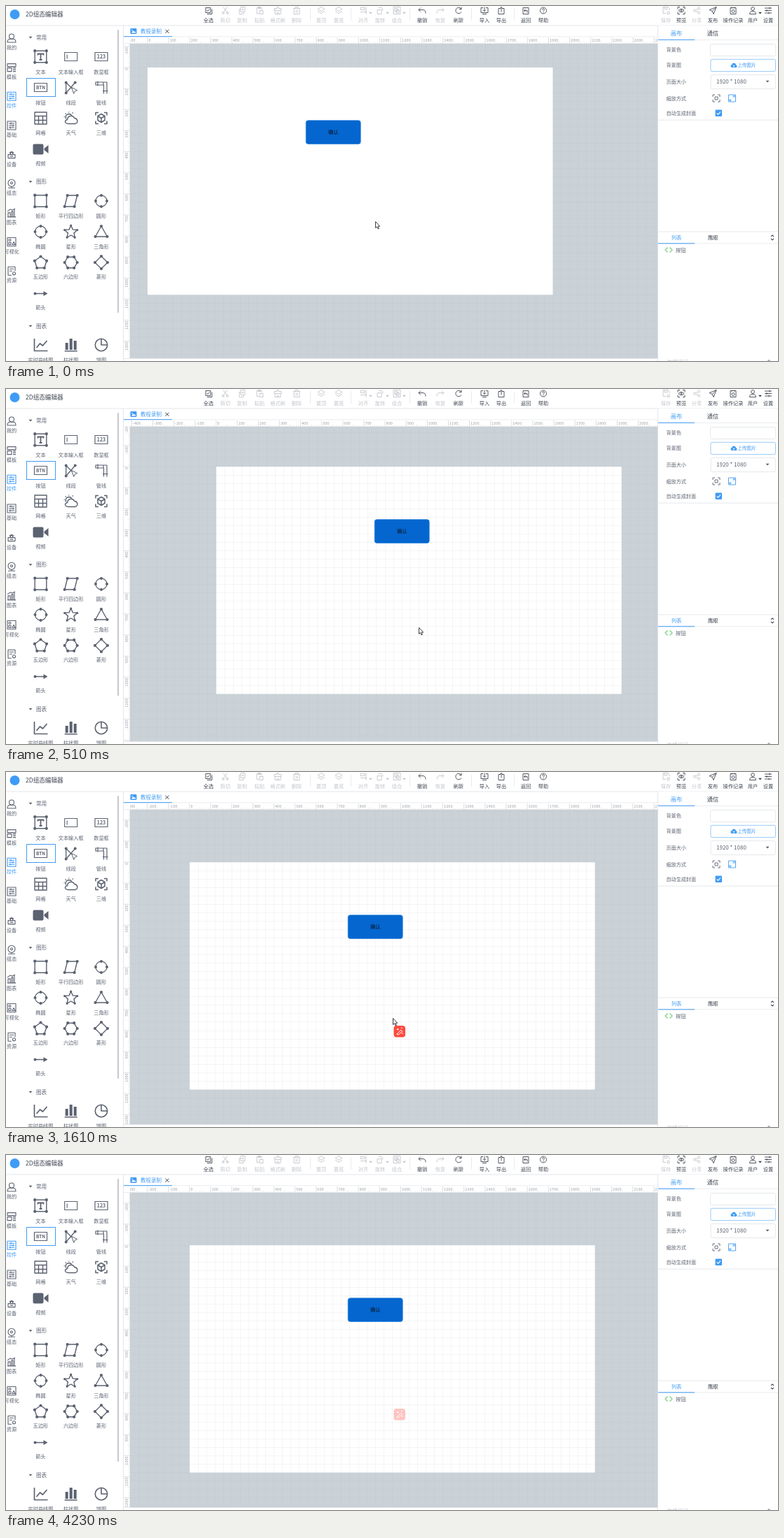
Write an HTML page that moves like this. It is 1102 px wide and 508 px high and loops after 4330 ms.

```html
<!DOCTYPE html>
<html>
<head>
<meta charset="utf-8">
<title>2D组态编辑器</title>
<style>
@property --x { syntax: "<length>"; inherits: true; initial-value: 202px; }
@property --y { syntax: "<length>"; inherits: true; initial-value: 88px; }
@property --cx { syntax: "<length>"; inherits: true; initial-value: 527px; }
@property --cy { syntax: "<length>"; inherits: true; initial-value: 308px; }
@property --show { syntax: "<number>"; inherits: true; initial-value: 1; }
@property --badge { syntax: "<number>"; inherits: true; initial-value: 0; }
@property --grid { syntax: "<number>"; inherits: true; initial-value: 1; }

html, body { margin: 0; width: 100%; height: 100%; overflow: hidden; background: #fff; }
svg { display: block; width: 1102px; height: 508px; animation: drag 4330ms step-end infinite; }
text { font-family: "Noto Sans CJK SC", "Noto Sans CJK", "Noto Sans", sans-serif; }
.page { transform: translate(var(--x), var(--y)); }
.rule-x { transform: translateX(var(--x)); }
.rule-y { transform: translateY(var(--y)); }
.cursor { transform: translate(var(--cx), var(--cy)); opacity: var(--show); }
.badge { opacity: var(--badge); }
.page-grid { opacity: var(--grid); }
.crisp { shape-rendering: crispEdges; }

@keyframes drag {
  0% { --x: 202px; --y: 88px; --cx: 527px; --cy: 308px; --show: 1; --badge: 0; --grid: .12; }
  3.46% { --x: 292px; --y: 70px; --cx: 584px; --cy: 293px; --grid: 1; }
  6.23% { --x: 316px; --y: 80px; --cx: 606px; --cy: 308px; }
  9% { --x: 314px; --y: 97px; --cx: 604px; --cy: 327px; }
  11.77% { --x: 300px; --y: 111px; --cx: 589px; --cy: 341px; }
  15.24% { --x: 286px; --y: 124px; --cx: 569px; --cy: 350px; }
  18.01% { --x: 274px; --y: 131px; --cx: 554px; --cy: 354px; }
  20.78% { --x: 265px; --y: 131px; --cx: 552px; --cy: 354px; }
  24.24% { --x: 262px; --y: 129px; --cx: 552px; --cy: 353px; }
  37.18% { --cx: 552px; --cy: 352px; --badge: 1; }
  40.64% { --cx: 626px; --cy: 390px; }
  44.11% { --cx: 738px; --cy: 431px; }
  47.57% { --cx: 850px; --cy: 474px; --badge: .92; }
  50.34% { --cx: 930px; --cy: 380px; --badge: .86; }
  53.11% { --cx: 975px; --cy: 240px; --badge: .8; }
  55.88% { --cx: 1000px; --cy: 110px; --badge: .75; }
  58.66% { --cx: 1001px; --cy: 60px; --badge: .7; }
  62.12% { --cx: 1031px; --cy: 250px; --badge: .67; }
  64.89% { --cx: 1022px; --cy: 491px; --badge: .64; }
  67.66% { --show: 0; --badge: .62; }
  76.21% { --badge: .6; }
  82.67% { --badge: .46; }
  97.69% { --badge: .32; }
}
</style>
</head>
<body>
<svg id="app" viewBox="0 0 1102 508"></svg>
<script>
const INK = '#5b6270', DARK = '#3f4652', OFF = '#c3c6cc', BLUE = '#409bf5', EDGE = '#e3e6eb';
const UNIT = 578.5 / 1920;
const out = [];
const add = s => out.push(s);

const text = (x, y, s, size = 7.2, fill = INK, anchor = 'middle', extra = '') =>
  add(`<text x="${x}" y="${y + size * .37}" font-size="${size}" fill="${fill}" text-anchor="${anchor}" ${extra}>${s}</text>`);
const rect = (x, y, w, h, fill, extra = '') =>
  add(`<rect x="${x}" y="${y}" width="${w}" height="${h}" fill="${fill}" ${extra}/>`);
const box = (x, y, w, h, stroke, r = 2, line = .8) =>
  rect(x, y, w, h, '#fff', `stroke="${stroke}" stroke-width="${line}" rx="${r}"`);
const icon = (x, y, d, stroke = INK, w = 1, fill = 'none') =>
  add(`<path transform="translate(${x} ${y})" d="${d}" stroke="${stroke}" stroke-width="${w}" fill="${fill}" stroke-linejoin="round"/>`);
const solid = (x, y, d, fill = INK) => icon(x, y, d, 'none', 0, fill);
const ring = (x, y, r) => `M${x - r} ${y}a${r} ${r} 0 1 0 ${2 * r} 0a${r} ${r} 0 1 0 ${-2 * r} 0`;
const caret = (x, y, fill) => solid(x, y, 'M-2.5-1.2H2.5L0 1.6Z', fill);

function lines(x0, x1, y0, y1) {
  const step = 40 * UNIT;
  let d = '';
  for (let i = x0; i <= x1; i++) d += `M${(i * step).toFixed(2)} ${y0 * step}V${y1 * step}`;
  for (let i = y0; i <= y1; i++) d += `M${x0 * step} ${(i * step).toFixed(2)}H${x1 * step}`;
  return d;
}

function canvasArea() {
  add(`<clipPath id="view"><rect x="177" y="54" width="753" height="450"/></clipPath>
    <clipPath id="top"><rect x="177" y="44" width="753" height="10"/></clipPath>
    <clipPath id="side"><rect x="168" y="54" width="9" height="450"/></clipPath>
    <clipPath id="sheet"><rect width="578.5" height="325.3"/></clipPath>`);
  rect(177, 54, 753, 450, '#cad1d7');
  add('<g clip-path="url(#view)"><g class="page">');
  add(`<path class="crisp" d="${lines(-30, 70, -15, 50)}" stroke="#c6ced4" fill="none"/>`);
  rect(0, 0, 578.5, 325.3, '#fff');
  add(`<g class="page-grid" clip-path="url(#sheet)"><path class="crisp" d="${lines(0, 48, 0, 27)}" stroke="#f5f5f6" fill="none"/></g>`);
  rect(226.2, 75.8, 78, 33.6, '#0566cf', 'stroke="#1c7cdc" stroke-width=".7" rx="3.2"');
  text(265.3, 92.7, '确认', 7.4, '#0a1526');
  add('</g></g>');
  rulers();
}

function rulers() {
  rect(168, 44, 762, 10, '#fff');
  rect(168, 54, 9, 450, '#fff');
  let h = '', v = '', hBig = '', vBig = '';
  for (let i = -60; i <= 260; i++) {
    const p = (i * 10 * UNIT).toFixed(2);
    if (i % 10) {
      const n = i % 5 ? 2 : 3.5;
      h += `M${p} 54v${-n}`;
      v += `M177 ${p}h${-n}`;
    } else {
      hBig += `M${p} 45V54`;
      vBig += `M168 ${p}H177`;
    }
  }
  const ticks = (d, c) => add(`<path d="${d}" stroke="${c}" stroke-width=".6" fill="none"/>`);
  const label = '#9da1a8';
  add('<g clip-path="url(#top)"><g class="rule-x">');
  ticks(h, '#dcdee2'); ticks(hBig, '#c4c7cc');
  for (let n = -600; n <= 2600; n += 100) text(n * UNIT + 1.5, 48.6, n, 5.6, label, 'start');
  add('</g></g><g clip-path="url(#side)"><g class="rule-y">');
  ticks(v, '#dcdee2'); ticks(vBig, '#c4c7cc');
  for (let n = -600; n <= 2000; n += 100)
    text(0, 0, n, 5.6, label, 'end', `transform="translate(172 ${n * UNIT + 1}) rotate(-90)"`);
  add('</g></g>');
  rect(168, 53.5, 762, .6, '#d9dce0');
  rect(176.6, 54, .6, 450, '#d9dce0');
  rect(168, 504, 762, 1, EDGE);
}

function toolbar() {
  add(`<circle cx="12.5" cy="12" r="7" fill="${BLUE}"/>`);
  text(28, 12, '2D组态编辑器', 8.6, DARK, 'start');
  const layers = 'M0-5L5-2L0 1L-5-2ZM-5 1L0 4L5 1';
  const items = [
    [289, '全选', 'M-4-4H3V3H-4ZM-2 5H5V-2M-2.5-.5L-1 1L1.5-2', 1],
    [313, '剪切', 'M-3-5L3 3M3-5L-3 3' + ring(-3, 3.5, 1.4) + ring(3, 3.5, 1.4)],
    [337, '复制', 'M-2-5H4V2H-2ZM-2-2H-4V5H2V2M1-3V0M-.5-1.5H2.5'],
    [362, '粘贴', 'M3-1V-4H-4V4H-1M-2-5H1V-3H-2ZM0 0H5V5H0Z'],
    [388, '格式刷', 'M-4 0V5H4V0M-5 0H5V-3H1V-5H-1V-3H-5ZM-1 2V5M1 2V5'],
    [415, '删除', 'M-5-3H5M-2-3V-5H2V-3M-4-3V5H4V-3M-1-1V3M1-1V3'],
    [450, '置顶', layers],
    [475, '置底', layers],
    [510, '对齐', 'M-4-4H2V-1H-4ZM-4 2H5M4-5V5', 0, 1],
    [534, '旋转', 'M-4-1H2V5H-4ZM-2-4H2Q4-4 4 0', 0, 1],
    [558, '组合', 'M-5-5H5V5H-5ZM-3-3H1V1H-3ZM-1-1H3V3H-1Z', 0, 1],
    [594, '撤销', 'M-2-4L-5-1L-2 2M-5-1H1Q5-1 5 4', 1],
    [620, '恢复', 'M2-4L5-1L2 2M5-1H-1Q-5-1-5 4'],
    [646, '刷新', 'M4-2A4.3 4.3 0 1 0 4 2M4-5V-2H1', 1],
    [683, '导入', 'M-2-4H-5V3H5V-4H2M0-5V1M-2-1L0 1L2-1M-3 5H3', 1],
    [707, '导出', 'M-1-3H-4V5H4V-3H1M0 2V-5M-2-3L0-5L2-3', 1],
    [742, '返回', 'M-4-4H4V5H-4ZM2 3V0H-2M-.5-2L-2.5 0L-.5 2', 1],
    [767, '帮助', ring(0, 0, 4.5) + 'M-1.5-1Q-1.5-2.6 0-2.6Q1.6-2.6 1.5-1.1Q1.4-.2 0 .4V1M0 2V3', 1],
    [942, '保存', 'M-4-5H3L5-3V0M-4-5V4H0M-2-5V-2H2V-5M2 2H5V5H2Z'],
    [964, '预览', 'M-5-2V-5H-2M2-5H5V-2M5 2V5H2M-2 5H-5V2M-4 0Q0-4.5 4 0Q0 4.5-4 0' + ring(0, 0, 1), 1],
    [986, '分享', ring(-3, 0, 1.6) + ring(3, -3, 1.6) + ring(3, 3, 1.6) + 'M-1.5-.7L1.5-2.3M-1.5.7L1.5 2.3'],
    [1009, '发布', 'M5-5L-5-1L-1 1L1 5ZM5-5L-1 1', 1],
    [1038, '操作记录', 'M-4-4H4V5H-4ZM-2-5V-3M2-5V-3' + ring(0, 1, 2), 1],
    [1066, '用户', ring(0, -2.5, 2.4) + 'M-4.5 5Q-4.5 1 0 1Q4.5 1 4.5 5Z', 1, 1],
    [1088, '设置', 'M-5-3.5H5M-5 0H5M-5 3.5H5M2-5V-2M-2-1.5V1.5M1 2V5', 1]
  ];
  for (const [x, name, d, on, drop] of items) {
    const c = on ? DARK : OFF;
    icon(x, 6.5, d, c, .9);
    text(x, 20, name, 7.2, c);
    if (drop) caret(x + 10.5, 10, c);
  }
  for (const x of [434, 492, 576, 664, 725]) rect(x, 3, .8, 18, EDGE);
  rect(0, 27.5, 1102, 1, EDGE);
}

function sidebar() {
  const sliders = 'M-6-6H6V6H-6ZM-4-3H4M-4 0H4M-4 3H4M-1-4.5V-1.5M2-1.5V1.5M-2 1.5V4.5';
  const items = [
    ['我的', ring(0, -2.5, 3.5) + 'M-6 6Q-6 0 0 1.5Q6 0 6 6Z'],
    ['模板', 'M-6-5H6V-1H-6ZM-6 1H0V6H-6ZM2 1H6M2 3.5H6M2 6H6'],
    ['控件', sliders],
    ['基础', sliders],
    ['设备', 'M-5 0H5V5H-5ZM-2 2.5H2M-3-2Q0-6 3-2M-1.5 0V-3H1.5V0'],
    ['组态', ring(0, -1, 5) + ring(0, -1, 1.5) + 'M-5 6H5M0 4V6'],
    ['图表', 'M-5 6V0H-2V6M0 6V-2H2V6M4 6V-5M-6-2L-2-5L1-4L5-6M-6 6H6'],
    ['可视化', 'M-6-6H6V6H-6ZM-4 4V1H-1V4ZM1 4L3 0L5 4Z' + ring(-2.5, -2.5, 1.5)],
    ['资源', 'M5 0V-6H-5V6H0M-3-3H3M-3 0H1' + ring(3.5, 3.5, 2)]
  ];
  items.forEach(([name, d], i) => {
    const c = i === 2 ? BLUE : INK, y = 46 + i * 41.65;
    icon(8, y, d, c, 1.1);
    text(8, y + 13.3, name, 7.2, c);
  });
}

// Outline with a dot on every corner
function poly(x, y, pts) {
  icon(x, y, `M${pts.map(p => p.join(' ')).join('L')}Z`, INK, 1.4);
  solid(x, y, pts.map(p => ring(...p, 2.1)).join(''));
}
const regular = (n, r, turn = -Math.PI / 2) => Array.from({ length: n }, (_, i) => {
  const a = turn + i * 2 * Math.PI / n;
  return [+(r * Math.cos(a)).toFixed(2), +(r * Math.sin(a)).toFixed(2)];
});

function palette() {
  const X = [49.5, 92.7, 136];
  const labels = (y, names) => names.forEach((s, i) => text(X[i % 3], y + Math.floor(i / 3) * 43.9, s));
  for (const [y, s] of [[45, '常用'], [251.5, '图形'], [458, '图表']]) {
    caret(35, y, INK);
    text(43, y, s, 7.6, INK, 'start');
  }
  labels(94, ['文本', '文本输入框', '数显框', '按钮', '线段', '管线', '网格', '天气', '三维', '视频']);
  labels(300, ['矩形', '平行四边形', '圆形', '椭圆', '星形', '三角形', '五边形', '六边形', '菱形', '箭头']);
  labels(506.5, ['实时曲线图', '柱状图', '饼图']);

  const [a, b, c] = X;
  const frame = 'M-9-6H9V6H-9Z', square = [[-8.3, -8.3], [8.3, -8.3], [8.3, 8.3], [-8.3, 8.3]];
  poly(a, 72.5, square);
  icon(a, 72.5, 'M-4-2V-4H4V-2M0-4V4.5M-2 4.5H2', INK, 1.8);
  icon(b, 72.5, frame + 'M-5.5-3V3', INK, 1.1);
  icon(c, 72.5, frame, INK, 1.2);
  text(c, 72.5, '123', 7, INK, 'middle', 'font-weight="700"');

  box(29.5, 103.5, 41, 26, BLUE, 0, 1);
  icon(a, 116.5, frame, INK, 1.2);
  text(a, 116.5, 'BTN', 6.5, INK, 'middle', 'font-weight="700"');
  icon(b, 116.5, 'M-7 8V-7L5 5M-7 8L6-7', INK, 1.3);
  solid(b, 116.5, ring(-7, -7, 2) + ring(-7, 8, 2) + ring(6, -7, 2));
  icon(b, 116.5, 'M1 0L9 4L5.5 5.5L4 9Z', INK, 1, '#fff');
  icon(c, 116.5, 'M-8-8V-3M-8-7.5H8V9M-8-3.5H3.5V9M-5-9V-2M2 5H9.5M3-8V-3', INK, 1.2);

  icon(a, 160.5, 'M-8.5-8.5H8.5V8.5H-8.5ZM-8.5-3H8.5M-8.5 3H8.5M-3-3V8.5M3-3V8.5', INK, 1.4);
  icon(b, 160.5, 'M-4 8H6Q10 7 9 3Q8 0 5 0Q3-4-1-3Q-5-2-5 2Q-9 3-8 6Q-7 8-4 8ZM-7 1Q-9-5-3-6Q0-6 1-4M-3-9V-8M-10-2H-9M-8-7L-7-6M2-7L3-8', INK, 1.4);
  icon(c, 160.5, 'M-8-4V-8H-4M4-8H8V-4M8 4V8H4M-4 8H-8V4M0-6L5-3V3L0 6L-5 3V-3ZM-5-3L0 0L5-3M0 0V6', INK, 1.5);
  solid(a, 205, 'M-9-7.5H2Q4-7.5 4-5.5V5.5Q4 7.5 2 7.5H-9Q-11 7.5-11 5.5V-5.5Q-11-7.5-9-7.5ZM5-1L11-6V6L5 1Z');

  poly(a, 279, square);
  poly(b, 279, [[-5, -8], [9, -8], [5, 8], [-9, 8]]);
  for (const [x, y] of [[c, 279], [a, 323]]) {
    icon(x, y, ring(0, 0, 8), INK, 1.3);
    solid(x, y, regular(4, 8).map(p => ring(...p, 2)).join(''));
  }
  const tips = regular(5, 9.5), dents = regular(5, 4.5, -Math.PI * .3);
  icon(b, 323.5, `M${tips.map((p, i) => p.join(' ') + 'L' + dents[i].join(' ')).join('L')}Z`, INK, 1.4);
  solid(b, 323.5, tips.map(p => ring(...p, 1.6)).join(''));
  poly(c, 323, [[0, -8], [8.5, 7], [-8.5, 7]]);
  poly(a, 367.5, regular(5, 9));
  poly(b, 367, regular(6, 9, 0));
  poly(c, 367, regular(4, 9));
  icon(a, 411.5, 'M-8 0H6', INK, 1.5);
  solid(a, 411.5, ring(-8, 0, 2) + 'M4-3.5L10 0L4 3.5Z');

  icon(a, 485, 'M-9-9V8.5H10M-6 4L-1-2L3 1L9-6', INK, 1.7);
  solid(b, 485, 'M-8-3H-4V7H-8ZM-2-9H2V7H-2ZM4-6H8V7H4ZM-9 8H9V9.5H-9Z');
  icon(c, 485, ring(0, 0, 8.7) + 'M0-8.7V0H8.7', INK, 1.6);

  rect(159, 34, 2.2, 405, '#c8cace', 'rx="1.1"');
  rect(167, 28, 1, 480, EDGE);
}

function tab() {
  icon(182, 36, 'M-4-3.5H4V3.5H-4Z', BLUE, 1, BLUE);
  solid(182, 36, 'M-3 2.5L-.5-1L1 1L2 0L3.5 2.5Z' + ring(-2, -1.5, .8), '#fff');
  text(192, 36.3, '教程录制', 7.5, BLUE, 'start');
  icon(230, 36.3, 'M-2.6-2.6L2.6 2.6M2.6-2.6L-2.6 2.6', DARK, 1);
  rect(168, 43.5, 762, .7, EDGE);
  rect(168, 43.2, 69, 1, BLUE);
}

function inspector() {
  rect(930, 28, 172, 480, '#fff');
  rect(930, 28, 1, 480, EDGE);
  const pair = (y, l, r, size) => {
    text(957, y, l, size, BLUE);
    text(1009, y, r, size, DARK);
  };
  pair(39, '画布', '通信', 8.2);
  rect(931, 48, 171, .8, EDGE);
  rect(931, 47.8, 52, 1, BLUE);
  [[62.5, '背景色'], [84.5, '背景图'], [108, '页面大小'], [132, '缩放方式'], [153.3, '自动生成封面']]
    .forEach(([y, s]) => text(942.5, y, s, 7.1, INK, 'start'));
  box(1005.5, 54.5, 93.2, 17, '#dfe2e8');
  box(1005.9, 76.3, 92.6, 17.3, '#7dbbf8');
  solid(1039, 85, 'M-3 3Q-5 2.5-4.5.3Q-4-1-2.8-1Q-2-4 1-3.3Q3-2.8 3-.8Q5-.5 4.5 1.5Q4 3 2.5 3Z', BLUE);
  icon(1039, 85, 'M0 3V0M-1.3 1L0-.4L1.3 1', '#fff', .8);
  text(1044, 85, '上传图片', 6.7, BLUE, 'start');
  box(1006, 98.5, 92.3, 20, '#dfe2e8');
  text(1014, 108.5, '1920 * 1080', 8, INK, 'start');
  caret(1087, 108, INK);
  const corners = 'M-5-2V-5H-2M2-5H5V-2M5 2V5H2M-2 5H-5V2';
  icon(1014, 132, corners + 'M-2-2H2V2H-2Z', INK, .9);
  icon(1036.5, 132, 'M-5-5H5V5H-5ZM1-1L3.5-3.5M1.3-3.5H3.5V-1.3M-1 1L-3.5 3.5M-3.5 1.3V3.5H-1.3', BLUE, .9);
  rect(1012.5, 148.5, 9.5, 9.5, BLUE, 'rx="1.2"');
  icon(1017.2, 153.3, 'M-2.6 0L-.7 2L2.7-2', '#fff', 1.1);
  rect(931, 162.7, 171, .9, EDGE);

  rect(931, 322.5, 171, .9, EDGE);
  pair(331.3, '列表', '鹰眼', 7.3);
  rect(931, 339.5, 171, .8, EDGE);
  rect(931, 339.3, 52, 1, BLUE);
  icon(1094, 331.3, 'M-2-1.5L0-3.5L2-1.5M-2 1.5L0 3.5L2 1.5', DARK, 1.1);
  icon(946, 349, 'M-1.5-3.5L-5 0L-1.5 3.5M1.5-3.5L5 0L1.5 3.5', '#8fd694', 1.6);
  text(956, 349.3, '按钮', 7.3, INK, 'start');
  text(943, 510, '选择图元', 8, OFF, 'start');
  icon(1089, 508, 'M-2.5 1L0-1.5L2.5 1', INK, 1);
}

function overlays() {
  add('<g class="badge">');
  rect(553.5, 363, 16.5, 16.5, '#ff4a3d', 'rx="4"');
  icon(561.8, 371.2, 'M-4 4L2-2L4 0L-2 5ZM-4-3H-1M-2.5-4.5V-1.5M2-5H4M3 3H5', '#fff', 1);
  add('</g><g class="cursor">');
  icon(0, 0, 'M.5.5V9.5L2.5 7.7L4 11L5.4 10.4L4 7.2H6.7Z', '#2a2d33', .9, '#fff');
  add('</g>');
}

canvasArea();
toolbar();
sidebar();
palette();
tab();
inspector();
overlays();
document.getElementById('app').innerHTML = out.join('');
</script>
</body>
</html>
```
